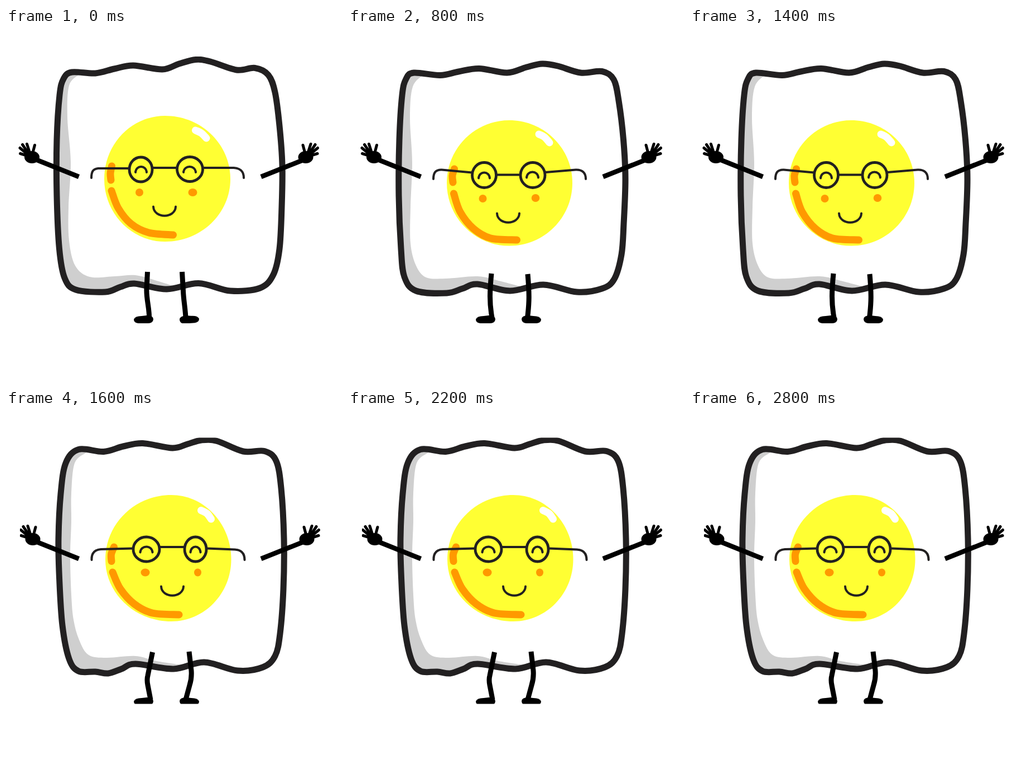
An HTML page that plays this animation: 602 px wide and 633 px high, repeating every 3000 ms.

```html
<!DOCTYPE html>
<html lang="en">
<head>
<meta charset="utf-8">
<title>Dancing egg</title>
<style>
  html, body { margin: 0; width: 100%; height: 100%; overflow: hidden; background: #fff; }
  svg { display: block; width: 100%; height: 100%; }
  path { fill: none; }
  .ink { stroke: #222021; stroke-linecap: round; }
  .limb { stroke: #000; }
  .shine, .glow { stroke-width: 13; stroke-linecap: round; }
  .shine { stroke: #fff; }
  .glow { stroke: #f90; }
  .cheek { fill: #f90; }
</style>
</head>
<body>
<svg id="stage" viewBox="0 0 602 633"></svg>
<script>
const STEP = 200;

// Poses in playing order; box is the visible area: left, top, right, bottom.
const poses = [
  {
    box: [22, 51, 562.5, 528],
    body: [118,79, 160,81, 194,73, 228,67, 280,74, 310,64, 340,56.5, 366,60, 413,75, 446,71.5, 470,84, 482,115,
      490,175, 495,245, 494,320, 490,395, 479,441, 455,465, 402,470, 345,456.5, 288,467, 230,457, 205,463, 178,472,
      125,468, 105,447, 95.5,395, 91,300, 91,200, 96,120, 103,91],
    shade: [131,83, 113,103, 110,160, 116,240, 112,320, 113,380, 124,425, 150,445, 195,444, 232,442, 270,452, 302,462],
    yolk: [176, 157, 402, 382, 285, 270],
    shine: [339.5,183, 350,188, 359,197],
    glow: [[189.5,247, 187,260, 188,272], [189,291, 201,322, 224,350, 256,366, 299.5,370]],
    lens: [[241.5,253,20.5,22], [329.5,252.5,23,22]],
    wire: 'M153 268C153 258 155 252 165 251H220M263 250H306M354 250H408C421 251 426 257 426 268',
    eyes: [[232,258,20], [318,258,22]],
    cheeks: [[239,294,7], [334.5,294,8]],
    mouth: [264, 319.5],
    hands: [45.5, 536.5],
    legs: 'M253.5 436L252 465C251 485 257 500 256.5 518M315.5 436L317.5 470C318 485 321 500 322 518',
    tilt: -4
  },
  {
    box: [22, 49, 565, 528],
    body: [118,80, 165,84.5, 198,78, 235,72.5, 285,80, 320,70, 348,64, 376,68, 417,80, 455,77.5, 476,92, 485,130,
      493.5,200, 497,270, 494,350, 490,405, 477,449, 455,466, 410,472, 350,459, 290,470, 232,458, 205,466, 177,474,
      122,470, 101,445, 95,395, 91,300, 92,200, 97,120, 104,91],
    shade: [136,83, 116,105, 111,160, 115,240, 112,320, 112,385, 122,425, 140,446, 175,448, 232,444, 270,452, 312,463],
    yolk: [177, 165, 402, 389.5, 289, 277],
    shine: [342,190, 352,195, 361,205],
    glow: [[190.5,252, 187,264, 188,276], [189.5,296, 201,329, 225,359, 256,376, 302.5,379]],
    lens: [[244,263,21.5,22.5], [331,263,22,22.5]],
    wire: 'M153 270C153 260 156 253 168 253.5L222 258.5M267 262.5H308M354 258L408 253.5C420 253 426 259 426 270',
    eyes: [[234,268.5,20], [320,267.5,21]],
    cheeks: [[241.5,305,7], [336,304,7.3]],
    mouth: [267, 331.5],
    hands: [45.5, 538.5],
    legs: 'M257 439C254 470 253 490 258 518M322 440C325 475 325 490 321.5 518',
    tilt: 0
  },
  {
    box: [25, 49.5, 566, 525.5],
    body: [130,70.5, 175,74.5, 210,65, 245,59.5, 298,68, 325,61, 350,54, 378,55.5, 425,74, 463,73.5, 484,91, 493,140,
      498,230, 497,320, 491,400, 482,440, 460,460, 415,466, 355,451, 300,463, 232,454, 207,463, 183,471, 160,468,
      130,467, 113,445, 101,385, 95.5,300, 94,230, 98,150, 107,95],
    shade: [144,76, 123,95, 117,150, 117,200, 115,260, 117,330, 121,375, 131,411, 148,438, 180,443, 232,440, 270,449, 322,457],
    yolk: [178, 152, 403.5, 378, 296, 267],
    shine: [349.5,179.5, 360,185, 367.5,195],
    glow: [[193.5,245, 188.5,258, 189,270.5], [191,290, 205,320, 230,347, 262,363, 310,366]],
    lens: [[251.5,249,23.5,22], [339.5,249,19.5,22]],
    wire: 'M153.5 268C153 258 157 250 170 249L228 247.5M276 245H320M360 247.5L410 249.5C422 250 427.5 256 427.5 268',
    eyes: [[240.5,254.5,22], [330.5,254.5,18]],
    cheeks: [[249.5,290.5,8], [343.5,290.5,6.5]],
    mouth: [278, 315.5],
    hands: [47, 538.5],
    legs: 'M262.5 433L254 475Q252 482 254 492L259 518M328 432L332 466Q333 480 329 492L322 518',
    tilt: 0
  }
];

// Smooth curve through a flat list of x, y pairs.
function curve(list, closed) {
  const n = list.length / 2;
  const at = i => {
    const k = closed ? (i + n) % n : Math.max(0, Math.min(n - 1, i));
    return [list[2 * k], list[2 * k + 1]];
  };
  let d = 'M' + at(0);
  for (let i = 0; i < (closed ? n : n - 1); i++) {
    const [a, b, c, e] = [at(i - 1), at(i), at(i + 1), at(i + 2)];
    const p = [0, 1].map(j => b[j] + (c[j] - a[j]) / 6);
    const q = [0, 1].map(j => c[j] - (e[j] - b[j]) / 6);
    d += `C${p} ${q} ${c}`;
  }
  return d + (closed ? 'Z' : '');
}

// Lopsided ellipse whose extremes sit at cx and cy.
function blob([l, t, r, b, cx, cy]) {
  const k = 0.448;
  const mix = (from, to) => from + (to - from) * k;
  return `M${cx} ${t}C${mix(r, cx)} ${t} ${r} ${mix(t, cy)} ${r} ${cy}` +
    `C${r} ${mix(b, cy)} ${mix(r, cx)} ${b} ${cx} ${b}` +
    `C${mix(l, cx)} ${b} ${l} ${mix(b, cy)} ${l} ${cy}` +
    `C${l} ${mix(t, cy)} ${mix(l, cx)} ${t} ${cx} ${t}Z`;
}

const path = (cls, d, extra = '') => `<path class="${cls}" d="${d}" ${extra}/>`;
const oval = (cls, x, y, rx, ry, extra = '') =>
  `<ellipse class="${cls}" cx="${x}" cy="${y}" rx="${rx}" ry="${ry}" ${extra}/>`;
const bow = (x, y, w, h) => `M${x} ${y}C${x + 1} ${y + h} ${x + w - 1} ${y + h} ${x + w} ${y}`;

function hand(x, side) {
  const tips = [[6, -21], [-8, -23], [-16, -22], [-20.5, -16], [-20, -6]];
  const fingers = tips.map(([dx, dy]) => `M${dx * 0.35} ${dy * 0.3}L${dx} ${dy}`).join('');
  return `<g transform="translate(${x} 230.5) scale(${side} 1)">` +
    oval('palm', 1, 0.5, 13.5, 11) +
    path('limb', fingers, 'stroke-width="5" stroke-linecap="round"') + '</g>';
}

const FOOT = 'M252 514Q264 514 264 521Q263 528 255 528H237Q229 527 229 521Q231 515 243 515Z';

function draw(p, i) {
  const [l, t, r, b] = p.box;
  const outline = curve(p.body, true);
  const [mx, my] = p.mouth;
  return `<clipPath id="box${i}"><rect x="${l}" y="${t}" width="${r - l}" height="${b - t}"/></clipPath>
    <clipPath id="body${i}"><path d="${outline}"/></clipPath>
    <g class="pose" clip-path="url(#box${i})">` +
    path('', curve(p.shade) + 'V540H60V60Z', `style="fill:#cfcfcf" clip-path="url(#body${i})"`) +
    path('ink', outline, 'stroke-width="11" stroke-linejoin="round"') +
    path('', blob(p.yolk), 'style="fill:#ff3"') +
    path('shine', curve(p.shine)) +
    p.glow.map(g => path('glow', curve(g))).join('') +
    p.lens.map(e => oval('ink', ...e, 'fill="none" stroke-width="4.8"')).join('') +
    path('ink', p.wire, 'stroke-width="4"') +
    p.eyes.map(([x, y, w]) => path('ink', bow(x, y, w, -13.3), 'stroke-width="4"')).join('') +
    p.cheeks.map(([x, y, w]) => oval('cheek', x, y, w, 7)).join('') +
    path('ink', bow(mx, my, 40, 21.5), 'stroke-width="4"') +
    path('limb', 'M48 233L130.5 266M540 233L457 266', 'stroke-width="8.5"') +
    hand(p.hands[0], 1) + hand(p.hands[1] + 1.5, -1) +
    path('limb', p.legs, 'stroke-width="9"') +
    path('', FOOT, 'style="fill:#000"') +
    path('', FOOT, `style="fill:#000" transform="rotate(${p.tilt} 328 521) translate(575 0) scale(-1 1)"`) +
    '</g>';
}

const stage = document.getElementById('stage');
stage.innerHTML = poses.map(draw).join('');
const groups = [...stage.querySelectorAll('.pose')];

function render(time) {
  const now = Math.floor(time / STEP) % poses.length;
  groups.forEach((g, i) => g.setAttribute('visibility', i === now ? 'visible' : 'hidden'));
}

const start = performance.now();
function tick() {
  render(performance.now() - start);
  requestAnimationFrame(tick);
}
tick();
</script>
</body>
</html>
```
